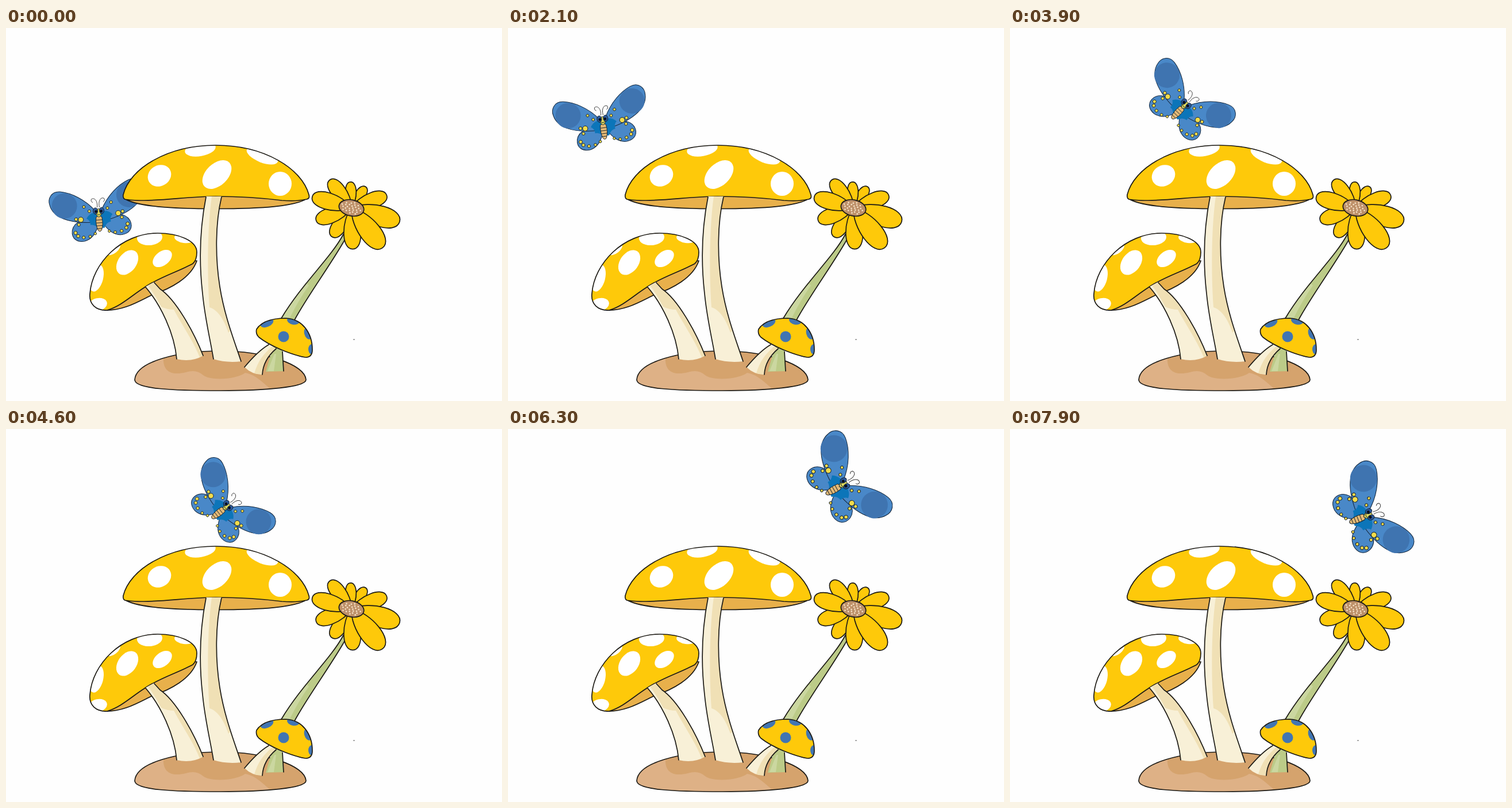
These frames come from a looping animation (863x649 px, 8000 ms). An HTML page:

```html
<!DOCTYPE html>
<html lang="en">
<head>
<meta charset="utf-8">
<title>Butterfly over mushrooms</title>
<style>
  html, body { margin: 0; width: 100%; height: 100%; overflow: hidden; background: #fefefe; }
  svg { display: block; width: 863px; height: 649px; }
  .line { stroke: #1c1a15; stroke-width: 1.7; stroke-linejoin: round; stroke-linecap: round; }
  .none { fill: none; }
  .cap { fill: #fec90a; }
  .under { fill: #e8b04b; }
  .cream { fill: #f8f0d7; }
  .shade { fill: #f0e0b5; }
  .wing { fill: #4988c8; stroke: #14273d; stroke-width: 1; }
  .fine { stroke: #14202c; stroke-width: .9; }
</style>
</head>
<body>
<svg viewBox="0 0 863 649">
  <defs>
    <path id="bigCap" d="M204 290C215 245 280 204 365 204C450 204 515 245 527 290Q529 297 523 298C510 301 495 301 480 300C440 295 405 293 365 293C320 293 280 300 240 300C228 300 216 300 207 298Q203 296 204 290Z"/>
    <path id="leftCap" d="M146 462C150 410 200 357 264 357C300 357 332 370 332 390Q332 404 325 410C300 424 265 434 240 452C218 466 200 484 176 491C156 492 144 480 146 462Z"/>
    <path id="smallCap" d="M436 524C445 510 465 505 487 505C515 506 533 530 533 560Q533 573 521 573C498 569 460 554 440 538Q434 532 436 524Z"/>
    <path id="mound" d="M224 612C226 580 300 562 372 562C450 562 520 585 522 612C522 625 450 631 373 631C290 631 224 628 224 612Z"/>
    <clipPath id="bigClip"><use href="#bigCap"/></clipPath>
    <clipPath id="leftClip"><use href="#leftCap"/></clipPath>
    <clipPath id="smallClip"><use href="#smallCap"/></clipPath>
    <clipPath id="moundClip"><use href="#mound"/></clipPath>

    <!-- one side of the butterfly, head at 0,0 -->
    <g id="side">
      <path class="wing" d="M7 15C22 8 45 10 51 26C55 40 46 48 33 48C21 47 13 40 5 25Z"/>
      <path class="wing" d="M5 0C20 -24 42 -39 60 -44C75 -48 84 -36 82 -24C80 -4 58 14 6 19Z"/>
      <path fill="#0c75b9" d="M0 2Q15 -1 23 10Q17 14 18 22Q10 22 5 31L0 30Z"/>
      <circle cx="57" cy="-18.500" r="22" fill="#3f74b0"/>
      <g id="dots" class="fine" fill="#f3dc4c"></g>
    </g>
  </defs>

  <g id="butterfly">
    <use href="#side"/>
    <use href="#side" transform="scale(-1 1)"/>
    <g transform="rotate(6)">
      <path class="fine" fill="#e3b976" d="M-5 11Q0 7 5 11Q7 25 3 34Q0 38 -3 34Q-7 25 -5 11Z"/>
      <path class="fine none" d="M-5 16H5M-5 21H5M-5 26H5M-4 31H4"/>
      <path class="fine" fill="#dcd65c" d="M-6 -2Q0 -5 6 -2Q7 7 0 11Q-7 7 -6 -2Z"/>
      <g class="fine" fill="#2c599b"><ellipse cx="-5.500" rx="4" ry="5.500"/><ellipse cx="5.500" rx="4" ry="5.500"/></g>
      <g fill="#0a0f1c"><circle cx="-4.500" cy="1" r="2.400"/><circle cx="4.500" cy="1" r="2.400"/></g>
      <path class="fine none" d="M-4 5Q0 9 4 5"/>
      <path class="none" stroke="#333" stroke-width=".9" d="M-2 -6C0 -18 -6 -24 -11 -21Q-13 -17 -9 -15M2 -6C0 -18 6 -24 11 -21Q13 -17 9 -15"/>
    </g>
  </g>

  <!-- ground -->
  <use href="#mound" fill="#deb186"/>
  <path clip-path="url(#moundClip)" fill="#d5a36d" d="M274 560V575C273 595 285 606 313 599Q331 593 343 604C355 614 400 612 416 600C438 604 448 620 466 632H530V560Z"/>
  <use href="#mound" class="line none"/>

  <!-- big mushroom -->
  <path class="under line" d="M205 296C225 311 290 314.500 365 314.500C440 314.500 510 311 527 294L500 285L230 285Z"/>
  <use href="#bigCap" class="cap"/>
  <g fill="#fff" clip-path="url(#bigClip)">
    <ellipse rx="27" ry="12" transform="translate(338 211) rotate(-10)"/>
    <ellipse rx="21" ry="18" transform="translate(267 257) rotate(-30)"/>
    <ellipse rx="30" ry="19" transform="translate(367 255) rotate(-44)"/>
    <ellipse rx="29" ry="12" transform="translate(446 222) rotate(22)"/>
    <ellipse rx="20" ry="21" transform="translate(477 271)"/>
  </g>
  <use href="#bigCap" class="none line"/>
  <path class="cream" d="M348 293C337 350 336 410 342 462C346 505 355 540 361 576Q383 583 409 580C395 538 380 500 372 450C364 400 364 340 375 293Z"/>
  <path class="shade" d="M358 293C350 350 350 430 354 486Q374 492 387 530L390 527C381 500 376 475 372 450C364 400 364 340 375 293Z"/>
  <path class="line none" d="M348 294C337 350 336 410 342 462C346 505 355 540 361 576M375 294C364 340 364 400 372 450C380 500 395 538 409 580"/>

  <!-- left mushroom -->
  <path class="under line" d="M172 491C205 492 230 476 255 464C285 454 322 435 332 405L300 405L200 470Z"/>
  <use href="#leftCap" class="cap"/>
  <g fill="#fff" clip-path="url(#leftClip)">
    <ellipse rx="24" ry="16" transform="translate(211 408) rotate(-54)"/>
    <ellipse rx="19" ry="12" transform="translate(272 401) rotate(-38)"/>
    <ellipse rx="22" ry="13" transform="translate(250 365) rotate(-5)"/>
    <ellipse rx="17" ry="8" transform="translate(310 366) rotate(8)"/>
    <ellipse rx="14" ry="7" transform="translate(187 385) rotate(-38)"/>
    <ellipse rx="12" ry="24" transform="translate(157 435) rotate(14)"/>
    <ellipse rx="16" ry="11" transform="translate(160 481) rotate(-12)"/>
  </g>
  <use href="#leftCap" class="none line"/>
  <path class="cream" d="M243 450Q250 446 258 442L268 454C295 472 326 527 343 570Q323 582 297 576C293 530 268 480 243 450Z"/>
  <path class="shade" d="M247 448L258 442L268 454C295 472 326 527 343 570L337 573C326 545 308 520 292 490Q280 490 270 485Q260 465 247 448Z"/>
  <path class="line none" d="M243 451C268 480 293 530 297 576M258 443L268 454C295 472 326 527 343 570"/>

  <!-- flower -->
  <path fill="#bccb88" d="M587 357C565 400 515 445 479 505L463 560L452 598L483 597L480 550L502 508C525 465 572 402 593 360Z"/>
  <path fill="#cbd7a0" d="M522 443Q499 472 481 505L492 508Q509 473 527 448ZM467 567L455 597L466 597L470 567Z"/>
  <path class="line none" d="M587 359C565 400 515 445 479 505M593 362C572 402 525 465 502 508M481 563L483 597"/>
  <g transform="translate(601 313)">
    <g id="petals" class="cap line"></g>
    <g transform="rotate(12)">
      <ellipse class="line" rx="22" ry="14" fill="#bd9069"/>
      <g id="seeds" fill="#f4dfc4"></g>
    </g>
  </g>

  <!-- small mushroom -->
  <path class="cream" d="M457 551C440 561 425 578 415 590Q428 603 446 603C447 584 456 570 470 558Z"/>
  <path class="shade" d="M463 554C448 567 438 580 432 601L446 603C447 584 456 570 470 558Z"/>
  <path class="line none" d="M457 551C440 561 425 578 415 590M470 558C456 570 447 584 446 603"/>
  <use href="#smallCap" class="cap"/>
  <g fill="#4175b2" clip-path="url(#smallClip)">
    <ellipse rx="12" ry="7" transform="translate(454 513) rotate(-25)"/>
    <circle cx="483" cy="537" r="9.500"/>
    <ellipse rx="11" ry="7" transform="translate(500 509) rotate(10)"/>
    <ellipse rx="7" ry="11" transform="translate(526 531) rotate(-15)"/>
    <ellipse rx="6" ry="9" transform="translate(532 559)"/>
  </g>
  <use href="#smallCap" class="none line"/>

  <path d="M604 542H607" stroke="#555"/>
</svg>
<script>
const byId = id => document.getElementById(id);
const repeat = (n, make) => Array.from({ length: n }, (_, i) => make(i));
const rad = degrees => degrees * Math.PI / 180;
const dot = (x, y, r) => `<circle cx="${x}" cy="${y}" r="${r}"/>`;

// wing dots: a rim on the hind wing, a row near the head, one big dot with two beside it
byId('dots').innerHTML = [
  ...repeat(5, i => dot(27 + 19 * Math.cos(rad(35 * i)), 31 + 11 * Math.sin(rad(35 * i)), 3 - i * .2)),
  ...repeat(2, i => dot(16 + 8 * i, -2 - 9 * i, 2.4)),
  dot(33, 10, 4.5), dot(41, 8, 2.8), dot(38, 18, 2.6)
].join('');

// ten even petals; the flower's tilt sets their lengths
byId('petals').innerHTML = repeat(10, i => {
  const turn = 88 - 36 * i;
  const len = 66 + 14 * Math.cos(rad(turn - 70)) + 14 * Math.cos(rad(2 * turn - 53));
  return { turn, len, w: len * .22 };
}).sort((a, b) => a.len - b.len).map(({ turn, len, w }) =>
  `<path transform="rotate(${turn})" d="M0 0C${len * .3} ${-1.2 * w} ${len} ${-1.3 * w} ${len} 0
    C${len} ${1.3 * w} ${len * .3} ${1.2 * w} 0 0Z"/>`).join('');

// seeds in a spiral, flattened to the disc
byId('seeds').innerHTML = repeat(26, i => {
  const r = Math.sqrt((i + .5) / 26);
  return dot(18 * r * Math.cos(i * 2.4), 10.5 * r * Math.sin(i * 2.4), 1.4);
}).join('');

// where the head is at each full second
const path = [[161, 318], [149, 239], [160, 163], [226, 129], [317, 132],
  [436, 130], [561, 99], [624, 97], [626, 152]];

function along(s, k) {
  const i = Math.floor(s), u = s - i;
  const at = j => path[Math.min(Math.max(j, 0), path.length - 1)][k];
  const a = at(i), b = at(i + 1), va = (b - at(i - 1)) / 2, vb = (at(i + 2) - a) / 2;
  return a + (b - a) * u * u * (3 - 2 * u) + u * (1 - u) * ((1 - u) * va - u * vb);
}

function smooth(s, from, to) {
  const u = Math.min(Math.max((s - from) / (to - from), 0), 1);
  return u * u * (3 - 2 * u);
}

const start = performance.now();
function frame() {
  const s = Math.floor((performance.now() - start) % 8000 / 100) / 10;
  const turn = 4 * (1 - smooth(s, 0, 1.3)) + 60 * smooth(s, 1.9, 4.5) + 16 * smooth(s, 4.5, 8) - 14;
  const size = 1 + .06 * smooth(s, 4.5, 6.3);
  byId('butterfly').setAttribute('transform',
    `translate(${along(s, 0)} ${along(s, 1)}) rotate(${turn}) scale(${size})`);
  requestAnimationFrame(frame);
}
frame();
</script>
</body>
</html>
```
